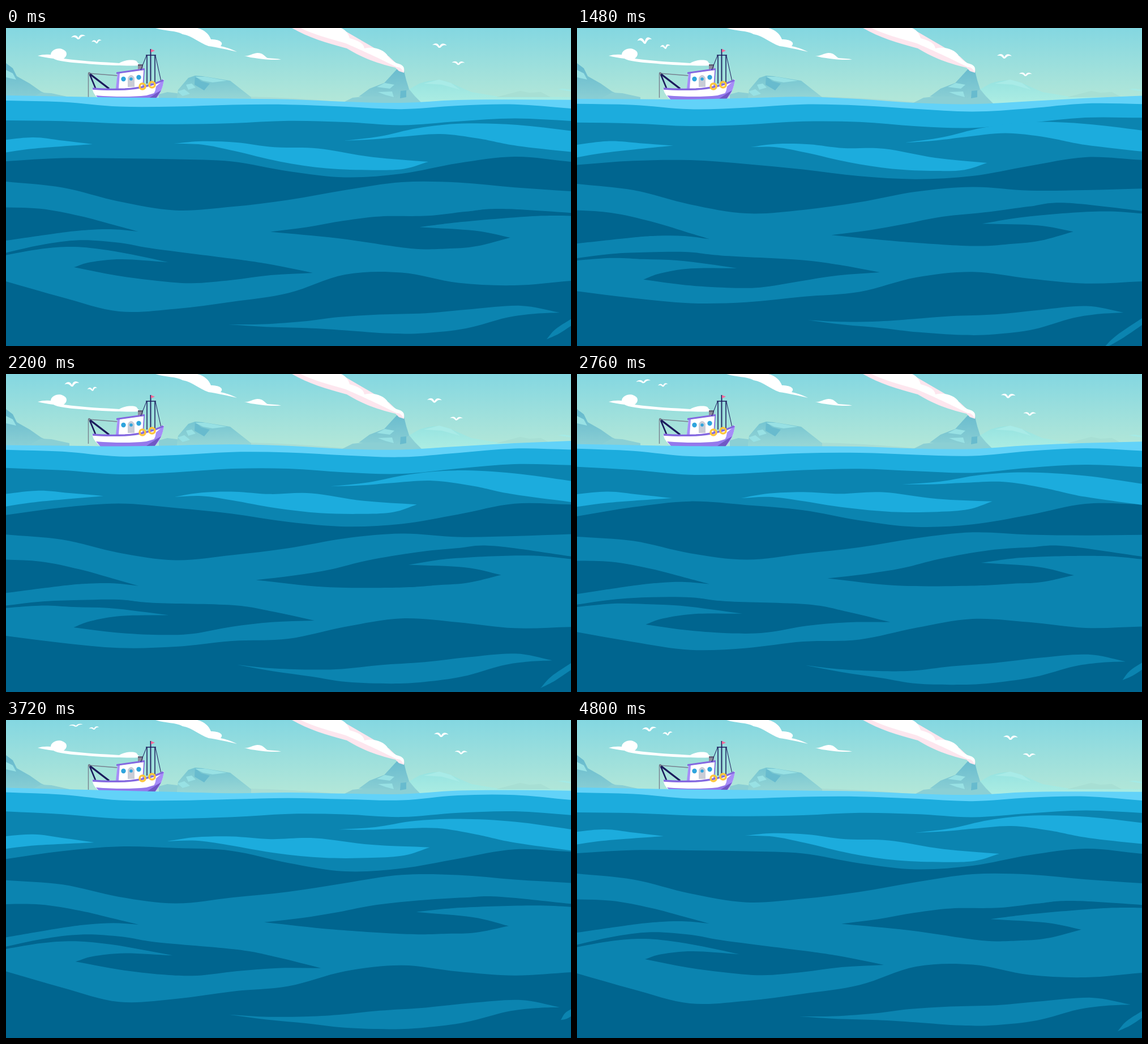
These frames come from a looping animation (998 px wide and 561 px high, 4.84 s). An HTML page with a canvas:

```html
<!DOCTYPE html>
<html lang="en">
<head>
<meta charset="utf-8">
<title>Boat on a rolling sea</title>
<style>
html, body { margin: 0; width: 100%; height: 100%; overflow: hidden; background: #00658f; }
canvas { display: block; width: 998px; height: 561px; }
</style>
</head>
<body>
<canvas id="stage" width="998" height="561"></canvas>
<script>
const W = 998, H = 561, LOOP = 4840, CYCLE = 4800, STEP = 40;
const FOAM = '#62d2f8', BRIGHT = '#1cacdd', MID = '#0b84b0', DARK = '#00658f';
const ctx = document.getElementById('stage').getContext('2d');
let cos = 1, sin = 0;

// ---- motion --------------------------------------------------------
// Every movement is one turn per cycle: [cosine part, sine part].
const turn = ([a, b]) => a * cos + b * sin;

// Motion at u (0..1) along evenly spread stations.
function along(stations, u) {
  const p = Math.max(0, Math.min(1, u)) * (stations.length - 1);
  const i = Math.min(Math.floor(p), stations.length - 2), f = p - i;
  return turn(stations[i]) * (1 - f) + turn(stations[i + 1]) * f;
}

// Closed curve through points; corners lists the sharp ones.
function smooth(points, corners, color) {
  const n = points.length;
  const pt = i => points[(i + n) % n];
  const handle = (at, next, prev, isCorner) => [0, 1].map(k =>
    at[k] + (isCorner ? (next[k] - at[k]) / 3 : (next[k] - prev[k]) / 6));
  ctx.beginPath();
  ctx.moveTo(...pt(0));
  for (let i = 0; i < n; i++) {
    const a = pt(i), b = pt(i + 1);
    ctx.bezierCurveTo(
      ...handle(a, b, pt(i - 1), corners.includes(i)),
      ...handle(b, a, pt(i + 2), corners.includes((i + 1) % n)), ...b);
  }
  ctx.fillStyle = color;
  ctx.fill();
}

// Water below an edge of evenly spaced resting heights.
const sea = (color, heights, swell) => () => {
  const last = heights.length - 1;
  const points = heights.map((y, i) => [W * i / last, y + along(swell, i / last)]);
  smooth([...points, [W, H], [0, H]], [0, last, last + 1, last + 2], color);
};

// A tapered patch: resting outline, vertical swell and sideways sway from left to right.
const patch = (color, corners, outline, swell, sway) => {
  const xs = outline.map(p => p[0]);
  const left = Math.min(...xs), span = Math.max(...xs) - left;
  return () => smooth(outline.map(([x, y]) => {
    const u = (x - left) / span;
    return [x + along(sway, u), y + along(swell, u)];
  }), corners, color);
};

const water = [
  sea(FOAM, [122, 123.5, 125, 125, 125, 126.5, 131, 132.5, 127, 124, 122.5],
    [[-3, 2], [-2.5, 0], [-.5, -4.3], [-1, 1], [0, 2.5], [4.3, -1.5]]),
  sea(BRIGHT, [130.5, 133.5, 142, 141, 137, 137, 141, 144.5, 137.5, 133, 138],
    [[-2.6, 2.6], [-3.5, 0], [-1.5, -3], [-2.2, 1], [-.5, 4.5], [4, -2.5]]),
  sea(MID, [164, 167, 173, 172, 168, 165.5, 169.5, 173.5, 165.5, 159.5, 163],
    [[-1, 2.6], [-4.5, -1.7], [0, -3.4], [-3.4, 2.6], [-.8, 1.6], [1, -4.7]]),
  sea(DARK, [242.5, 232.5, 228.5, 233, 240, 256.5, 266.5, 261, 243.5, 228, 233],
    [[-7.5, -4], [1.5, 5.5], [-4.5, 8.5], [-3, -1], [-5, -2], [3, 1]]),
  sea(MID, [278, 287.5, 311, 325, 317, 305, 288, 276.5, 279.5, 283.5, 285.5],
    [[-7, -6], [-5, -1.7], [-1.7, 3.5], [-2, 0], [-7, 5], [2.6, -1.5]]),
  sea(DARK, [453.5, 474.5, 492, 488.5, 477, 467.5, 441, 431.5, 443.5, 451, 446],
    [[-6.5, 9], [8, -4], [6, -1], [-6, -3.3], [6, .7], [0, 1]]),

  patch(BRIGHT, [0, 3, 6],
    [[-20, 207], [50, 200], [105, 205], [162, 211], [95, 216], [40, 221], [-20, 230]],
    [[-7.5, -1], [-6, -6]], [[0, 0], [-9, 5]]),
  patch(BRIGHT, [0, 6],
    [[296, 211], [345, 205], [405, 205], [470, 211], [545, 211], [640, 225], [737, 232],
      [695, 245], [640, 248], [560, 246], [480, 236], [400, 220], [345, 211]],
    [[-7, -4], [1, 2], [4, 8]], [[1, 12], [9, -10]]),
  patch(BRIGHT, [0, 5, 6],
    [[585, 198], [650, 191], [720, 177], [800, 170], [900, 174], [1020, 189],
      [1020, 226], [900, 211], [830, 197], [760, 188], [690, 192], [640, 196]],
    [[1, 5], [-1.5, -5], [-5, -8]], [[12, -1], [0, 0]]),
  patch(DARK, [0, 4, 8],
    [[-20, 322], [60, 325], [130, 338], [190, 354], [234, 366],
      [190, 362], [145, 363], [95, 368], [-20, 384]],
    [[-6, -4], [-7, 4]], [[0, 0], [0, 0]]),
  patch(DARK, [0, 7, 8, 11, 13],
    [[454, 361], [520, 353], [585, 342], [650, 330], [735, 322], [805, 315], [870, 311], [1020, 326],
      [1020, 330], [930, 326], [800, 333], [721, 343], [820, 349], [883, 362],
      [825, 376], [775, 380], [705, 382], [575, 373]],
    [[-1.5, 4], [-2, 3], [9.5, 6], [8, 0], [2, -1]], [[13, 0], [6, -5]]),
  patch(DARK, [0, 7, 13, 16],
    [[-20, 406], [60, 392], [130, 386], [200, 388], [260, 396], [400, 407], [470, 418], [545, 434],
      [470, 437], [400, 445], [330, 454], [270, 453], [195, 446], [120, 434],
      [150, 424], [205, 417], [288, 419], [235, 410], [180, 402], [120, 398], [60, 399], [-20, 409]],
    [[-5, 1], [-12, 6], [-7, 3], [0, 2], [-2, -4]], [[1, 0], [-3, -12]]),
  patch(MID, [0, 8],
    [[400, 518], [460, 521], [530, 520], [590, 516], [660, 510], [740, 506], [820, 498], [905, 492], [972, 504],
      [930, 506], [880, 513], [810, 532], [740, 541], [680, 543], [600, 539], [535, 532], [465, 526]],
    [[5, -1], [-6, -5], [-2, -1], [-2, -3]], [[-7, 5], [6, -5]]),
  patch(MID, [0, 2, 3],
    [[953, 549], [970, 530], [1005, 507], [1005, 519], [976, 538]],
    [[0, 20], [2, 1]], [[2, -27], [0, 0]])
];

// ---- birds: each circles slowly around its resting place -----------
const bird = (x, y, half, tilt, driftX, driftY, lift, flap) => () => {
  const h = lift + turn([0, flap]);
  ctx.save();
  ctx.translate(x + turn(driftX), y + turn(driftY));
  ctx.rotate(tilt);
  ctx.beginPath();
  ctx.moveTo(-half, 0);
  ctx.bezierCurveTo(-half * 0.6, -h * 0.6, -half * 0.2, -h * 0.5, 0, h * 0.25);
  ctx.bezierCurveTo(half * 0.2, -h * 0.5, half * 0.6, -h * 0.6, half, 0);
  ctx.bezierCurveTo(half * 0.6, -h * 0.15, half * 0.4, 0, half * 0.15, h * 0.5);
  ctx.quadraticCurveTo(0, h * 0.65, -half * 0.15, h * 0.5);
  ctx.bezierCurveTo(-half * 0.4, 0, -half * 0.6, -h * 0.15, -half, 0);
  ctx.fillStyle = '#fff';
  ctx.fill();
  ctx.restore();
};

const birds = [
  bird(122, 15.5, 13, -0.1, [5.7, -0.6], [0, 6.4], 8, 3.5),
  bird(156, 23.5, 9, -0.15, [4, 1.3], [0, 9.6], 6.5, 1.5),
  bird(762, 37, 13, 0.02, [3.7, -6.2], [-6.5, 10.7], 8, 0),
  bird(798, 68.5, 11.5, 0.02, [1, -5.8], [-7, 10.9], 6.5, 0)
];

// ---- still scenery -------------------------------------------------
function fade(y0, y1, top, bottom) {
  const g = ctx.createLinearGradient(0, y0, 0, y1);
  g.addColorStop(0, top);
  g.addColorStop(1, bottom);
  return g;
}
function shape(d, color) {
  ctx.fillStyle = color;
  ctx.fill(new Path2D(d));
}
function line(d, color, width) {
  ctx.strokeStyle = color;
  ctx.lineWidth = width;
  ctx.stroke(new Path2D(d));
}
function disc(x, y, r, color) {
  ctx.beginPath();
  ctx.arc(x, y, r, 0, 7);
  ctx.fillStyle = color;
  ctx.fill();
}
function ring(x, y) {
  ctx.beginPath();
  ctx.arc(x, y, 5, 0, 7);
  ctx.strokeStyle = '#ffc63c';
  ctx.lineWidth = 3.6;
  ctx.stroke();
}

function drawSky() {
  ctx.fillStyle = fade(0, 130, '#84d7e1', '#b3e7d8');
  ctx.fillRect(0, 0, W, 150);
  shape('M56 49Q66 46 79 47C80 36 98 32 106 42C108 46 107 50 102 54C140 59 170 60 200 62C208 57 222 55 230 58C233 61 232 63 241 66C220 67 190 66 170 65C130 62 92 60 84 54Q68 52 56 49Z', '#fff');
  shape('M264 0C282 6 300 4 312 11C330 14 340 26 358 32C372 34 390 38 408 42C396 36 388 34 379 32C386 25 376 20 362 20C358 10 350 3 338 0Z', '#fff');
  shape('M421 49C430 50 434 45 444 44C455 44 456 50 462 53C470 54 480 54 486 55.5C470 57 450 55 440 53Q430 52 421 49Z', '#fff');
}

function drawLand() {
  const rock = '#68bbce', haze = '#8bcfd4', ice = '#98e1e4';
  const cool = fade(70, 126, rock, haze);

  shape('M700 115L730 98Q765 86 790 99L822 113L870 121L998 122V140H700Z', fade(90, 130, '#95e3e1', '#abece2'));
  shape('M738 98L765 91L786 97L802 109L770 100Z', '#a8ebe7');
  shape('M866 122L908 111L924 114L945 113L962 122Z', '#a7dfd4');
  shape('M974 108L985 107L998 109V112Z', '#a5eae5');
  shape('M425 121Q500 122 600 131V140H425Z', '#a9ddd4');

  shape('M0 62L12 71L19 85L42 98L62 112L85 122V140H0Z', cool);
  shape('M0 74L12 80L18 91L0 87Z', ice);
  shape('M46 122L62 114L80 115L112 122V135H46Z', haze);

  shape('M270 117L285 113L302 115L316 123V135H270Z', haze);
  shape('M302 122L304 109L322 88L334 84L347 85L396 93L433 122V138H302Z', fade(84, 126, '#75c5d2', '#97d6d5'));
  shape('M334 85L345 94L360 98L350 110L333 100Z', rock);
  shape('M334 86L352 86L390 93L365 96L348 93Z', ice);
  shape('M318 100L328 98L335 105L322 109Z', ice);
  shape('M303 112L315 108L325 116L312 120Z', ice);

  shape('M594 132L612 123L640 120L712 108L722 120L738 136H594Z', haze);
  shape('M623 121L642 107L668 97L692 71L703 76L707 92L712 108L690 124L660 121Z', cool);
  shape('M655 104L669 97L686 100L678 107Z', ice);
  shape('M657 113L682 112L685 122L670 118Z', ice);
  shape('M697 111L707 110V122L696 124Z', rock);

  shape('M505 0C535 17 565 26 602 36C625 50 650 61 688 70L694 76L703 79C705 67 700 66 690 63L676 50L590 0Z', '#fde6ee');
  shape('M520 0C545 12 570 18 600 27C625 38 652 50 690 69Q698 68 702 78C705 66 699 65 690 62C682 58 678 54 675 50C668 37 648 32 633 36C632 26 620 22 607 18C604 8 599 3 592 0Z', '#fff');
}

function drawBoat() {
  const navy = '#1b1b5c', violet = '#8468e0', lilac = '#a68df8', steel = '#77818f', glass = '#2fa4dc';
  line('M145.5 80V123M146 80L197 84', steel, 1.4);
  line('M148 81L182 107', navy, 3.4);
  line('M148 82L158 106', navy, 2.6);
  disc(147, 80, 2.2, steel);
  shape('M233 65H242V76H233Z', '#8d8f9c');
  shape('M233 64H242V67H233Z', '#64667a');
  shape('M197 80L244 74L242 107H195Z', '#fff');
  shape('M197 80L201 80L199 107H194Z', lilac);
  shape('M195 78L245 71V74L195 81Z', violet);
  line('M244 74L242 104', violet, 1.6);
  shape('M215 104V88Q221 78 227 88V104Z', '#c9ccd6');
  disc(207.5, 90, 4.2, glass);
  disc(221, 90, 2.8, glass);
  disc(234.5, 87, 4.2, glass);
  line('M255.5 37V98', navy, 1.8);
  line('M249 48V98M263 48V96M247 48H265', navy, 1.5);
  line('M248 49L238 74M264 49L274 94', navy, 1);
  shape('M256 37L263 40L256 43Z', '#f56c9a');
  shape('M152 107Q175 109 210 108Q248 106 279 90C277 106 272 118 262 128H168Q156 121 152 107Z', '#fff');
  shape('M250 128Q264 118 265 103L279 91C277 106 272 118 262 128Z', lilac);
  shape('M159 119Q210 123 248 119L272 112L262 128H167Z', '#9479ec');
  shape('M248 127Q262 117 274 110L262 128Z', '#7058c4');
  line('M153 107Q175 109 210 108Q248 106 278 92', violet, 3.4);
  ring(241, 103);
  ring(258, 100);
}

function frame() {
  const t = Math.floor(performance.now() % LOOP / STEP) * STEP;
  const angle = 2 * Math.PI * t / CYCLE;
  cos = Math.cos(angle);
  sin = Math.sin(angle);
  drawSky();
  drawLand();
  birds.forEach(draw => draw());
  drawBoat();
  water.forEach(draw => draw());
  requestAnimationFrame(frame);
}
frame();
</script>
</body>
</html>
```
